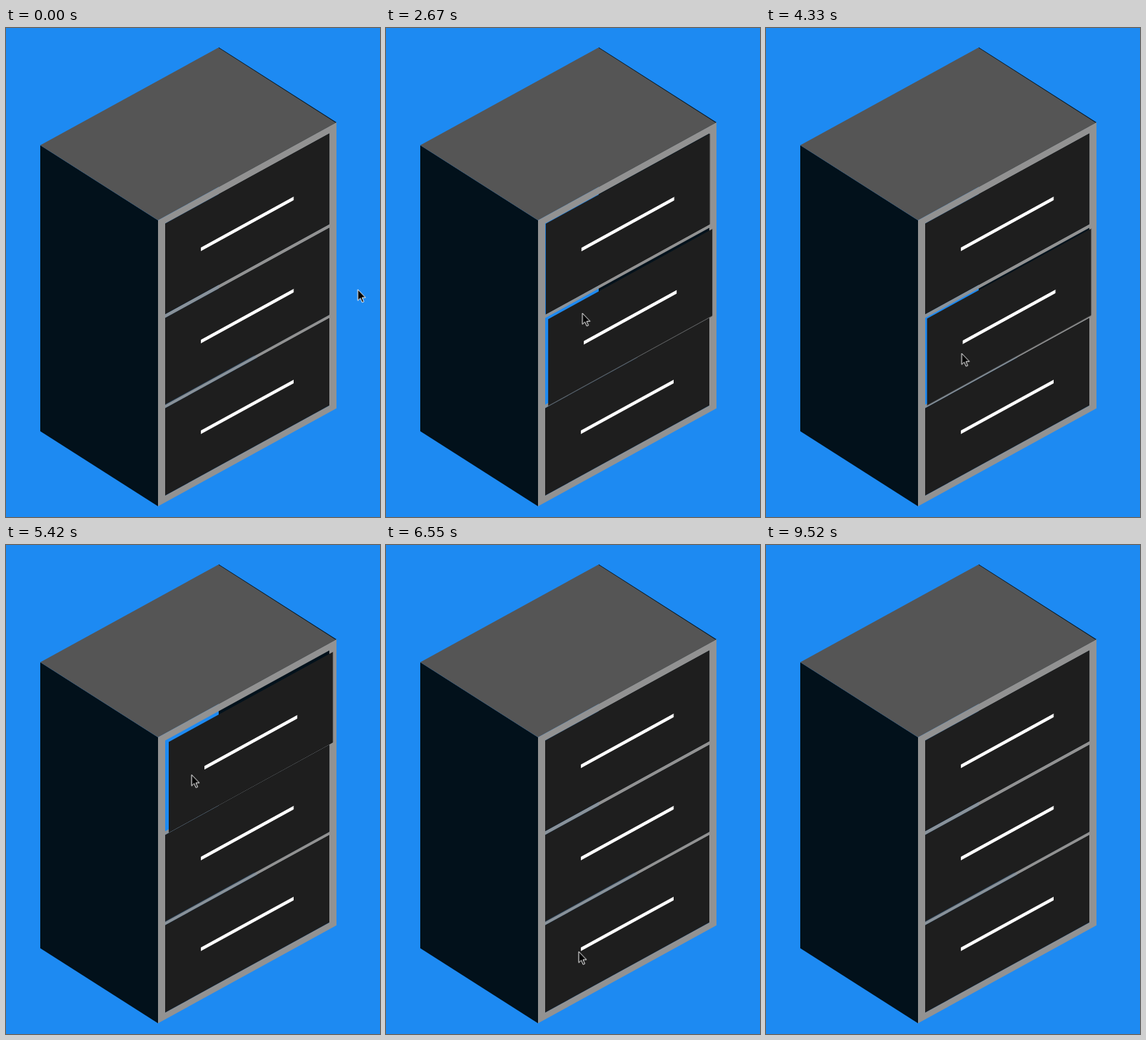
Write an HTML page that moves like this. It is 524 px wide and 684 px high and loops after 9550 ms.

```html
<!DOCTYPE html>
<html lang="en">
<head>
<meta charset="utf-8">
<title>Drawers</title>
<style>
  html, body { margin: 0; width: 100%; height: 100%; overflow: hidden; background: #1d8af2; }
  svg { display: block; width: 524px; height: 684px; }

  .drawer { fill: #1e1e1e; }
  .handle { fill: #fff; }
  .rail { fill: #929292; }
  .rail-lit { fill: #89929a; }

  .top { animation: top 9550ms linear infinite; }
  .middle { animation: middle 9550ms linear infinite; }
  .cursor { animation: roam 9550ms linear infinite, leave 9550ms step-end infinite; }

  /* Translations are in the skewed space of the cabinet front. */
  @keyframes top {
    0%, 3.98%, 13.2%, 18.75%, 28.4%, 47.75%, 61.4%, 80.6%, 90.9%, 100% { transform: translate(0, 0); }
    6.7%, 10.5%, 21.5%, 25.7%, 50.5%, 58.6%, 83.5%, 88.2% { transform: translate(5px, 4.74px); }
    81.26% { transform: translate(1px, .95px); }
  }
  @keyframes middle {
    0%, 10.5%, 17.2%, 25.7%, 37.4%, 44%, 50.5%, 58.6%, 64.4%, 70.7%, 82.7%, 88.4%, 91%, 100% { transform: translate(0, 0); }
    13.2%, 14.7%, 28.4%, 34.66%, 46.6%, 47.75%, 61.4%, 61.8%, 73.3%, 80% { transform: translate(5px, 4.74px); }
    35.18% { transform: translate(4px, 3.79px); }
    81.26% { transform: translate(2.5px, 2.37px); }
    89.4% { transform: translate(2px, 1.9px); }
  }
  @keyframes roam {
    0% { transform: translate(493px, 366px); }
    4% { transform: translate(430px, 250px); }
    7% { transform: translate(360px, 290px); }
    10.5% { transform: translate(335px, 345px); }
    14.7% { transform: translate(322px, 472px); }
    16.6% { transform: translate(318px, 560px); }
    18.743% { transform: translate(315px, 308px); }
    22% { transform: translate(300px, 320px); }
    25.7% { transform: translate(285px, 368px); }
    31% { transform: translate(262px, 440px); }
    35.183% { transform: translate(259px, 515px); }
    38% { transform: translate(256px, 570px); }
    41%, 42.2% { transform: translate(262px, 585px); }
    44% { transform: translate(272px, 502px); }
    47.75% { transform: translate(278px, 372px); }
    51.1%, 53.9% { transform: translate(272px, 305px); }
    56.754% { transform: translate(260px, 321px); }
    58.6% { transform: translate(262px, 382px); }
    61.8% { transform: translate(266px, 506px); }
    64% { transform: translate(268px, 590px); }
    68.586% { transform: translate(270px, 569px); }
    70.7% { transform: translate(274px, 498px); }
    75% { transform: translate(290px, 440px); }
    80% { transform: translate(284px, 368px); }
    81.257% { transform: translate(282px, 362px); }
    83.5%, 87.5% { transform: translate(285px, 322px); }
    88.4% { transform: translate(300px, 362px); }
    90% { transform: translate(325px, 480px); }
    92.7%, 97.7% { transform: translate(345px, 608px); }
    99.6%, 100% { transform: translate(250px, 596px); }
  }
  @keyframes leave {
    0% { visibility: visible; }
    99.65%, 100% { visibility: hidden; }
  }
</style>
</head>
<body>
<svg viewBox="0 0 524 684">
  <!-- inner right wall, outer left wall, lid -->
  <path fill="#02111b" d="M298 27 463 132V532L298 427Z"/>
  <path fill="#02111b" d="M48 164 213 269V669L48 564Z"/>
  <path fill="#555" d="M48 164 297.5 27.5 462 132.5 213 269Z"/>

  <!-- front face: x 0..250, y 0..400 -->
  <g transform="matrix(1 -.548 0 1 213 269)">
    <path class="rail" fill-rule="evenodd" d="M0 0H250V400H0ZM10 10V390.5H240V10Z"/>
    <path class="rail" d="M10 137H240V142H10ZM10 263.5H240V268.2H10Z"/>
    <path class="rail-lit" d="M10 137H85V142H10ZM10 263.5H138V268.2H10Z"/>
    <g>
      <path class="drawer" d="M10 268.2H240V390.5H10Z"/>
      <path class="handle" d="M60 327H190V332H60Z"/>
    </g>
    <g class="middle">
      <path class="drawer" d="M10 142H240V263.5H10Z"/>
      <path class="handle" d="M60 200H190V205H60Z"/>
    </g>
    <g class="top">
      <path class="drawer" d="M10 10H240V137H10Z"/>
      <path class="handle" d="M60 71H190V76H60Z"/>
    </g>
  </g>

  <path class="cursor" fill="#000" stroke="#fff" d="M0 0V15.5L3.6 12.2 6.1 18 8.5 17 6 11.3H10.8Z"/>
</svg>
</body>
</html>
```
